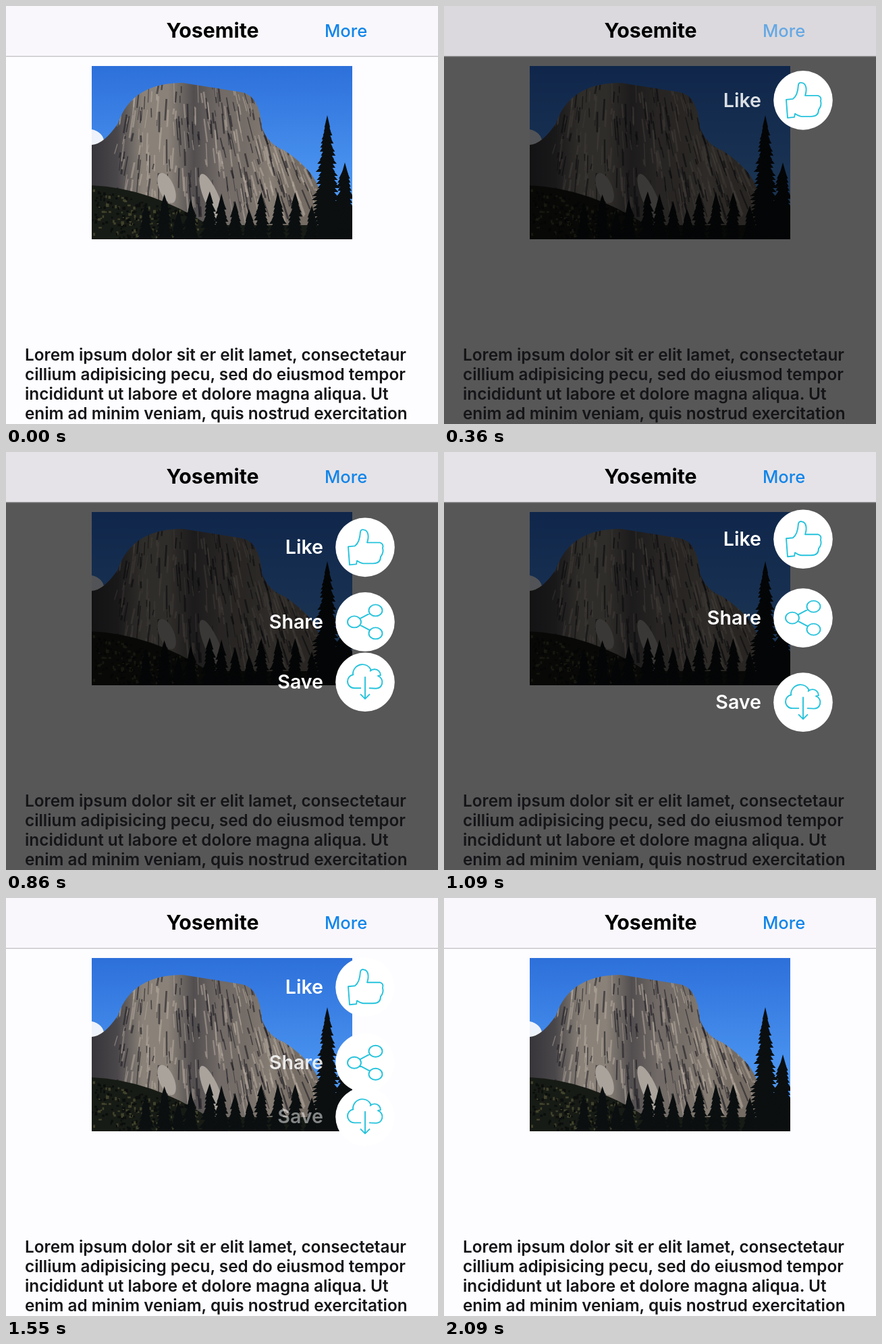
An HTML page with a canvas that plays this animation: 640x620 px, repeating every 2.13 s.

```html
<!DOCTYPE html>
<html lang="en">
<head>
<meta charset="utf-8">
<title>Menu</title>
<style>
html, body { margin: 0; width: 100%; height: 100%; overflow: hidden; background: #fdfcff; }
canvas, svg { position: absolute; left: 0; top: 0; width: 640px; height: 620px; }
text { font-family: Inter, "Liberation Sans", sans-serif; }
.body { font-size: 24.3px; font-weight: 600; fill: #151417; }
.label { font-size: 28.6px; font-weight: 600; fill: #fff; text-anchor: end; }
.title { font-size: 30.3px; font-weight: 700; text-anchor: middle; }
.more { font-size: 25.6px; font-weight: 500; fill: #1185ea; }
</style>
</head>
<body>
<canvas id="stage" width="640" height="620"></canvas>
<svg viewBox="0 0 640 620">
  <g class="body">
    <text x="28" y="526">Lorem ipsum dolor sit er elit lamet, consectetaur</text>
    <text x="28" y="555.3">cillium adipisicing pecu, sed do eiusmod tempor</text>
    <text x="28" y="584.3">incididunt ut labore et dolore magna aliqua. Ut</text>
    <text x="28" y="613">enim ad minim veniam, quis nostrud exercitation</text>
  </g>
  <text class="label" x="470">Like</text>
  <text class="label" x="470">Share</text>
  <text class="label" x="470">Save</text>
  <rect id="nav" width="640" height="74"/>
  <rect id="rule" y="74" width="640" height="1.3"/>
  <text class="title" x="306" y="47">Yosemite</text>
  <text class="more" id="more" x="472" y="46">More</text>
</svg>
<script>
const LOOP = 2130, STEP = 45.4;
const ctx = document.getElementById('stage').getContext('2d');
const nav = document.getElementById('nav');
const rule = document.getElementById('rule');
const more = document.getElementById('more');
const labels = document.querySelectorAll('.label');

const clamp = v => Math.max(0, Math.min(1, v));
const ramp = (t, a, b) => clamp((t - a) / (b - a));
const gray = (a, b, k) => {
  const v = Math.round(a + (b - a) * k);
  return `rgb(${v},${v - 2},${v + 2})`;
};

let seed = 7;
const rnd = (a = 0, b = 1) => a + (b - a) * (seed = seed * 16807 % 2147483647) / 2147483647;

function gradient(g, x, y, colors) {
  const fill = g.createLinearGradient(127, 89, x, y);
  colors.forEach((c, i) => fill.addColorStop(i / (colors.length - 1), c));
  return fill;
}

function pine(g, x, top, w) {
  g.fillStyle = '#0b0f10';
  for (let y = top; y < 346; y += 6) {
    const r = w * ((y - top + 12) / (360 - top)) ** 0.6;
    g.beginPath();
    g.moveTo(x, y - 8);
    g.lineTo(x + r * rnd(0.75, 1.2), y + 10);
    g.lineTo(x - r * rnd(0.75, 1.2), y + 10);
    g.fill();
  }
}

function makePhoto() {
  const c = document.createElement('canvas');
  c.width = 386;
  c.height = 257;
  const g = c.getContext('2d');
  g.translate(-127, -89);
  g.fillStyle = gradient(g, 127, 270, ['#2d70da', '#4d97f2']);
  g.fillRect(127, 89, 386, 257);
  g.fillStyle = '#eef2fa';
  g.beginPath();
  g.ellipse(128, 198, 18, 14, 0.5, 0, 7);
  g.fill();

  // rock face
  g.save();
  g.fillStyle = gradient(g, 467, 89,
    ['#37353a', '#4a474a', '#8a8279', '#8a8279', '#524e4f', '#716a66', '#746d67', '#857c73', '#756c64', '#756c64']);
  g.beginPath();
  g.moveTo(127, 206);
  g.quadraticCurveTo(145, 205, 166, 174);
  g.quadraticCurveTo(186, 114, 262, 114);
  g.lineTo(350, 128);
  g.quadraticCurveTo(376, 134, 379, 180);
  g.quadraticCurveTo(388, 205, 412, 214);
  g.quadraticCurveTo(467, 250, 467, 290);
  g.lineTo(467, 346);
  g.lineTo(127, 346);
  g.fill();
  g.clip();
  for (let i = 0; i < 420; i++) {
    const x = rnd(165, 465), y = rnd(112, 300), h = rnd(8, 36);
    g.strokeStyle = rnd() < 0.52 ? 'rgba(30,29,36,.6)' : 'rgba(188,176,164,.5)';
    g.lineWidth = rnd(0.8, 3);
    g.beginPath();
    g.moveTo(x, y);
    g.lineTo(x + (x - 250) * h / 500 + rnd(-2, 2), y + h);
    g.stroke();
  }
  g.fillStyle = '#aaa39c';
  for (const [x, y, h] of [[238, 270, 24], [305, 286, 40]]) {
    g.beginPath();
    g.ellipse(x, y, 11, h, -0.4, 0, 7);
    g.fill();
  }
  g.restore();

  // forest
  g.fillStyle = '#171b15';
  g.beginPath();
  g.moveTo(127, 266);
  g.quadraticCurveTo(215, 270, 300, 325);
  g.lineTo(513, 325);
  g.lineTo(513, 346);
  g.lineTo(127, 346);
  g.fill();
  for (let i = 0; i < 260; i++) {
    const x = rnd(127, 285);
    g.fillStyle = rnd() < 0.6 ? '#0b0e0c' : '#42432c';
    g.fillRect(x, rnd(270 + (x - 127) * 0.25, 344), rnd(2, 5), rnd(2, 5));
  }
  for (let x = 207; x < 465; x += rnd(17, 29)) pine(g, x, rnd(283, 310), rnd(12, 17));
  pine(g, 476, 170, 26);
  pine(g, 502, 240, 24);
  return c;
}
const photo = makePhoto();

function thumb(p) {
  p.addPath(new Path2D('M-25 -1L-15 -2Q-8 -7 -7 -23Q-6 -27 -2 -26C5 -25 6 -16 3 -7L22 -7Q28 -5 26 1Q28 8 23 14Q23 24 12 24L-3 24Q-8 23 -12 20L-13 25L-23 26Z'));
}

function nodes(p) {
  for (const [x, y] of [[-16, 0], [15.5, -17], [15.5, 17]]) {
    p.moveTo(x + 10, y);
    p.ellipse(x, y, 10, 8.5, 0, 0, Math.PI * 2);
  }
  for (const s of [-1, 1]) {
    p.moveTo(-8, 4.5 * s);
    p.lineTo(7, 12.5 * s);
  }
}

function cloud(p) {
  p.moveTo(-6, 9);
  p.arc(-16, -1, 10, Math.PI / 2, Math.PI * 1.45);
  p.arc(-4, -12, 14, Math.PI * 0.97, Math.PI * 1.85);
  p.arc(14, -10, 9, Math.PI * 1.25, Math.PI * 2);
  p.arc(16, 0, 9.5, Math.PI * 1.6, Math.PI * 2.5);
  p.lineTo(6, 9);
  p.moveTo(0, -8);
  p.lineTo(0, 25);
  p.moveTo(-7, 18);
  p.lineTo(0, 25);
  p.lineTo(7, 18);
}

const items = [
  { y: 133, start: 330, end: 1573, icon: thumb },
  { y: 248, start: 365, end: 1523, icon: nodes },
  { y: 362, start: 490, end: 1475, icon: cloud }
];
for (const item of items) item.icon(item.path = new Path2D());

// damped swing around the resting place
const swing = t => 80 * Math.exp(-0.0036 * t) * Math.cos(Math.PI * 2 * (t - 138) / 450);

function drawItem({ y: rest, start, end, path }, i, t) {
  const out = ramp(t, end, end + 108);
  const alpha = out < 1 ? ramp(t, start, start + 38) * (1 - out * 0.8) : 0;
  const y = rest + swing(t - start) - 100 * out * out;
  labels[i].setAttribute('y', y + 10);
  labels[i].setAttribute('opacity', alpha);
  if (!alpha) return;
  ctx.save();
  ctx.translate(532, y);
  ctx.fillStyle = '#fff';
  ctx.beginPath();
  ctx.arc(0, 0, 43.8, 0, Math.PI * 2);
  ctx.fill();
  ctx.strokeStyle = '#25c3dc';
  ctx.lineWidth = 1.9;
  ctx.lineJoin = 'round';
  ctx.stroke(path);
  ctx.restore();
}

function draw(t) {
  const dim = ramp(t, 130, 340) * (1 - ramp(t, 1460, 1540));
  ctx.fillStyle = '#fdfcff';
  ctx.fillRect(0, 0, 640, 620);
  ctx.drawImage(photo, 127, 89);
  ctx.fillStyle = `rgba(0,0,0,${0.655 * dim})`;
  ctx.fillRect(0, 0, 640, 620);
  items.forEach((item, i) => drawItem(item, i, t));

  nav.setAttribute('fill', gray(249, 219 + 10 * ramp(t, 370, 520), dim));
  rule.setAttribute('fill', gray(194, 150, dim));
  const press = ramp(t, 88, 140) * (1 - ramp(t, 270, 500));
  more.setAttribute('opacity', 1 - 0.7 * press);
}

function frame(now) {
  const t = now % LOOP;
  draw(t < 87 ? 0 : 90 + Math.floor((t - 87) / STEP) * STEP);
  requestAnimationFrame(frame);
}
draw(0);
requestAnimationFrame(frame);
</script>
</body>
</html>
```
